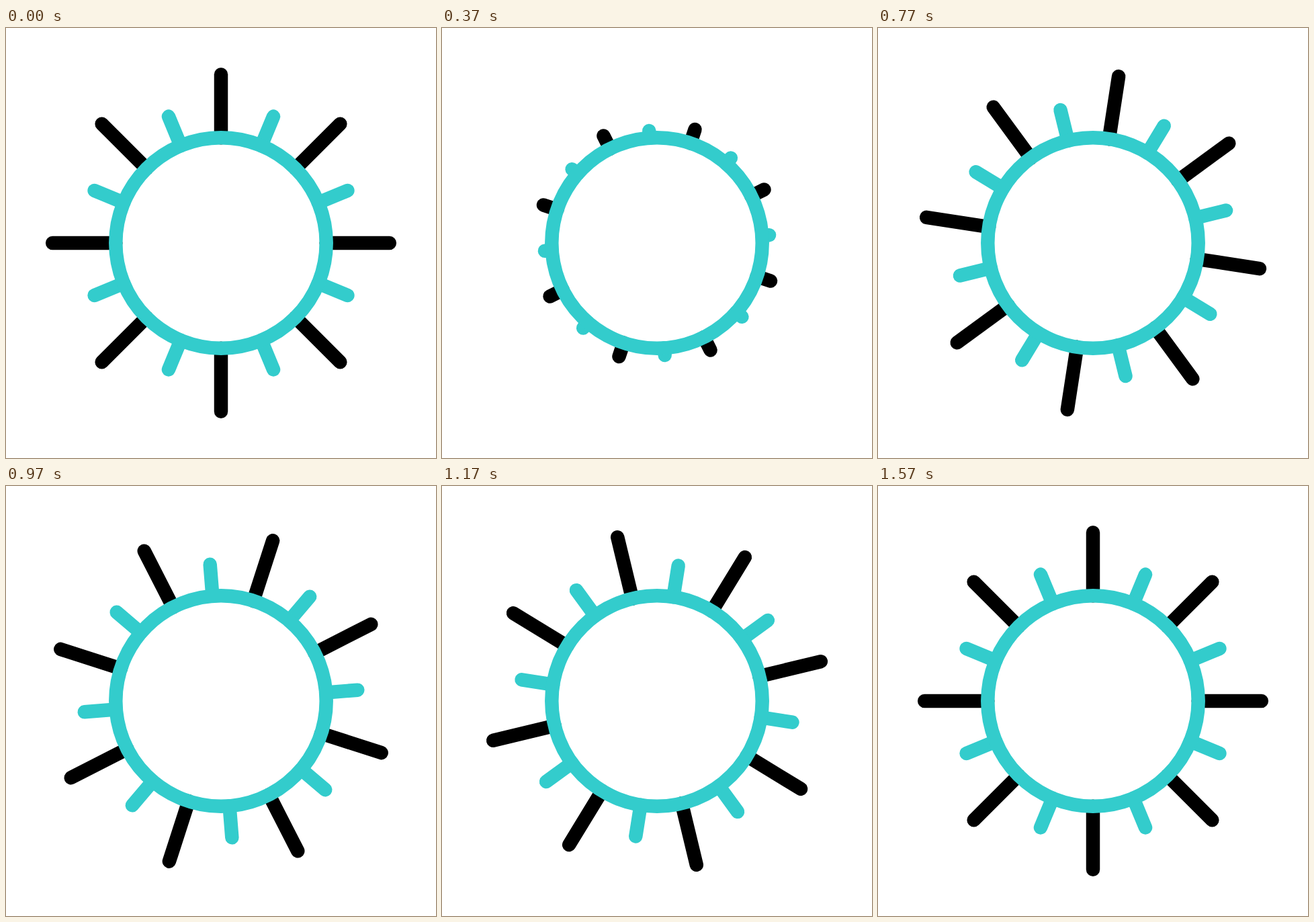
An HTML page that plays this animation: 640 px wide and 640 px high, repeating every 1670 ms.

```html
<!DOCTYPE html>
<html lang="en">
<head>
<meta charset="utf-8">
<title>Sun</title>
<style>
  html, body { margin: 0; width: 100%; height: 100%; overflow: hidden; background: #fff; }
  svg { display: block; width: 100%; height: 100%; }
  line, circle { fill: none; stroke-width: 20.5; stroke-linecap: round; }
</style>
</head>
<body>
<svg viewBox="0 0 640 640">
  <g transform="translate(320 320)">
    <g id="rays"></g>
    <circle r="156.7" stroke="#33cccc"/>
  </g>
</svg>
<script>
const LOOP = 1670, FPS = 30, LAST = 47;
const RING = 156.7, LONG = 250.8, SHORT = 203.9;

// Steps: [ms, value]
const TURN = [[0, 0], [600, -38.5], [1567, 0]];
const LENGTH = [[0, 1], [550, 0], [735, 1]];

const group = document.getElementById('rays');
const rays = Array.from({ length: 16 }, (_, i) => {
  const el = document.createElementNS('http://www.w3.org/2000/svg', 'line');
  const long = i < 8;
  el.setAttribute('stroke', long ? '#000' : '#33cccc');
  el.setAttribute('transform', `rotate(${i * 45 + (long ? 0 : 22.5)})`);
  el.setAttribute('y1', -RING);
  group.append(el);
  return { el, reach: (long ? LONG : SHORT) - RING };
});

// Symmetric cubic-bezier(.43, 0, .57, 1), solved by bisection
function ease(x) {
  let lo = 0, hi = 1;
  for (let i = 0; i < 24; i++) {
    const u = (lo + hi) / 2, v = 1 - u;
    if (1.29 * u * v * v + 1.71 * u * u * v + u * u * u < x) lo = u;
    else hi = u;
  }
  return lo * lo * (3 - 2 * lo);
}

function valueAt(steps, t) {
  for (let i = 1; i < steps.length; i++) {
    const [t0, a] = steps[i - 1], [t1, b] = steps[i];
    if (t < t1) return a + (b - a) * ease((t - t0) / (t1 - t0));
  }
  return steps[steps.length - 1][1];
}

function draw(ms) {
  // 30 pictures per second on a 10 ms clock, the last one held
  const clock = Math.floor((ms % LOOP) / 10) * 10;
  const tick = Math.min(LAST, Math.floor((clock + 3.4) * FPS / 1000));
  const t = tick * 1000 / FPS;
  group.setAttribute('transform', `rotate(${valueAt(TURN, t)})`);
  const grow = valueAt(LENGTH, t);
  for (const { el, reach } of rays) el.setAttribute('y2', -RING - reach * grow - 0.01);
}

const start = performance.now();
function loop() {
  draw(performance.now() - start);
  requestAnimationFrame(loop);
}
loop();
</script>
</body>
</html>
```
